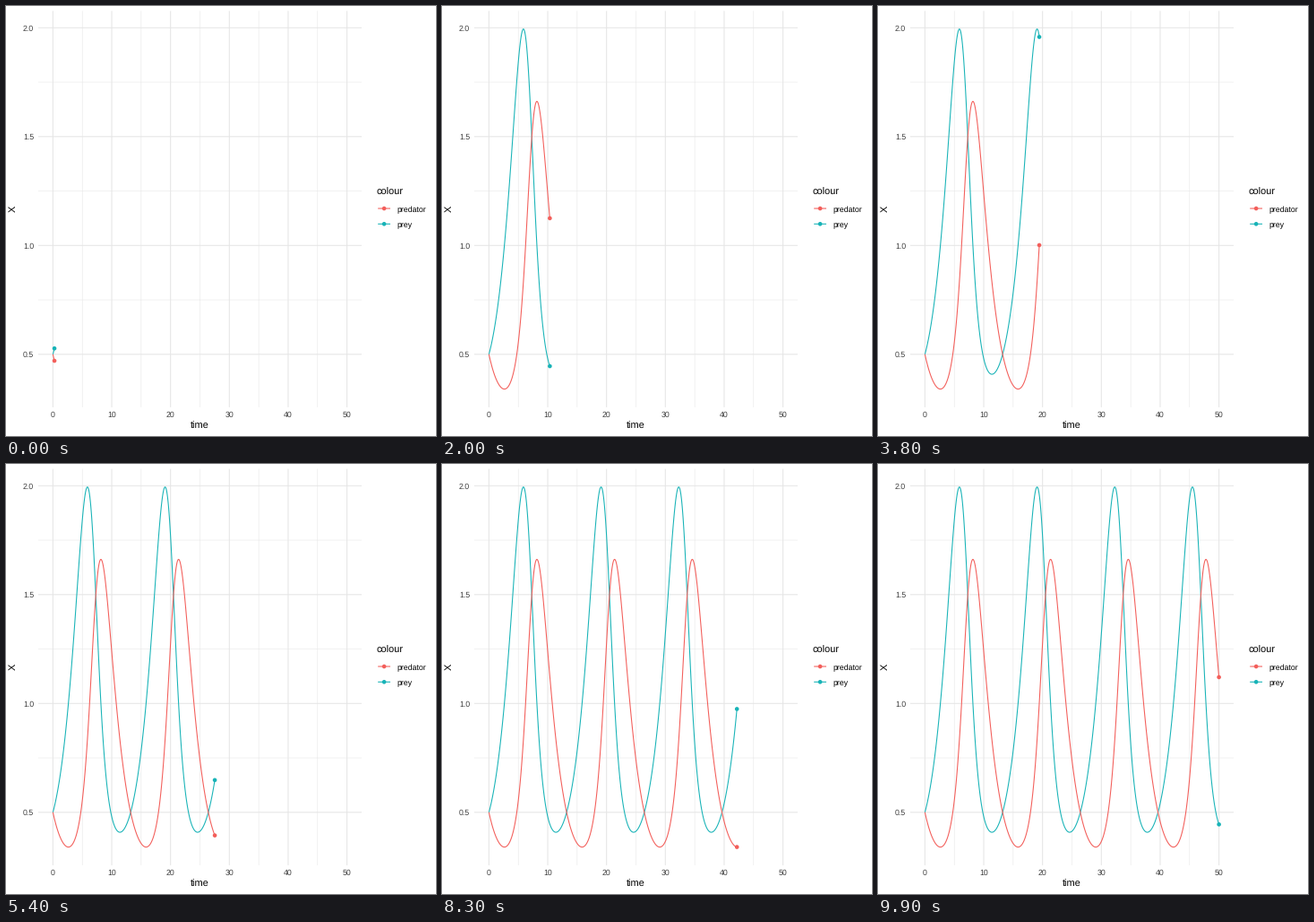
Write a matplotlib script that moves like this. It is 480 px wide and 480 px high and loops after 10 s.

```python
import numpy as np
import matplotlib as mpl
import matplotlib.pyplot as plt
from matplotlib.animation import FuncAnimation
from matplotlib.patches import Circle

mpl.rcParams["font.family"] = "Liberation Sans"
mpl.rcParams["text.hinting"] = "none"
mpl.rcParams["path.simplify"] = False

SIZE, FRAMES, T_END = 480, 100, 50.0
PREDATOR, PREY = "#F35E5A", "#17B3B7"
GRID, TICK = "#E6E6E6", "#3D3D3D"
LEFT, RIGHT, TOP, BOTTOM = 36.0, 397.0, 5.5, 447.9
LINE = 1.07


def px(t):
    return 52.4 + 6.564 * np.asarray(t)


def py(v):
    return 24.3 + 243.0 * (2 - np.asarray(v))


def rates(s):
    """Lotka-Volterra: prey, predator."""
    x, y = s
    return np.array([0.5 * x - 0.6 * x * y, 0.5 * x * y - 0.5 * y])


def solve(dt=0.02):
    times = np.arange(0, T_END + dt / 2, dt)
    states = [np.array([0.5, 0.5])]
    for _ in times[1:]:
        s = states[-1]
        k1 = rates(s)
        k2 = rates(s + dt / 2 * k1)
        k3 = rates(s + dt / 2 * k2)
        k4 = rates(s + dt * k3)
        states.append(s + dt / 6 * (k1 + 2 * k2 + 2 * k3 + k4))
    return times, np.array(states).T


times, (prey, predator) = solve()

# One unit is one pixel, with y pointing down.
fig = plt.figure(figsize=(SIZE / 72, SIZE / 72), dpi=72, facecolor="white")
ax = fig.add_axes([0, 0, 1, 1])
ax.set_xlim(0, SIZE)
ax.set_ylim(SIZE, 0)
ax.axis("off")


def stroke(xs, ys, color, width=LINE, z=2):
    return ax.plot(xs, ys, color=color, lw=width, zorder=z, snap=False,
                   solid_capstyle="butt", solid_joinstyle="round")[0]


def dot(x, y, color):
    return ax.add_patch(Circle((x, y), 2.3, fc=color, ec="none", zorder=4))


def label(x, y, text, size=8.8, color="black", **kw):
    ax.text(x, y, text, fontsize=size, color=color, va="baseline", **kw)


def vline(t, width):
    stroke([px(t)] * 2, [TOP, BOTTOM], GRID, width, 1)


def hline(v, width):
    stroke([LEFT, RIGHT], [py(v)] * 2, GRID, width, 1)


for t in range(5, 50, 10):
    vline(t, LINE / 2)
for v in (0.75, 1.25, 1.75):
    hline(v, LINE / 2)
for t in range(0, 51, 10):
    vline(t, LINE)
    label(px(t), 459.2, str(t), color=TICK, ha="center")
for v in (0.5, 1.0, 1.5, 2.0):
    hline(v, LINE)
    label(31.05, py(v) + 3.2, f"{v:.1f}", color=TICK, ha="right")

label(216.5, 472, "time", 11, ha="center")
ax.text(13.4, 226.8, "X", fontsize=11, rotation=90, ha="right", va="center")

label(413.5, 211, "colour", 11)
for y, name, color in ((226, "predator", PREDATOR), (243.3, "prey", PREY)):
    stroke([415.2, 429], [y, y], color)
    dot(422.1, y, color)
    label(436.2, y + 3.8, name)

series = [(values, stroke([], [], color), dot(0, 0, color))
          for values, color in ((prey, PREY), (predator, PREDATOR))]


def update(i):
    now = min(T_END, (i + 0.5) * T_END / (FRAMES - 1))
    past = times < now
    artists = []
    for values, line, head in series:
        v = np.interp(now, times, values)
        line.set_data(px(np.append(times[past], now)),
                      py(np.append(values[past], v)))
        head.center = (px(now), py(v))
        artists += [line, head]
    return artists


anim = FuncAnimation(fig, update, frames=FRAMES, interval=100,
                     repeat=True, repeat_delay=0, blit=False)
plt.show()
```
